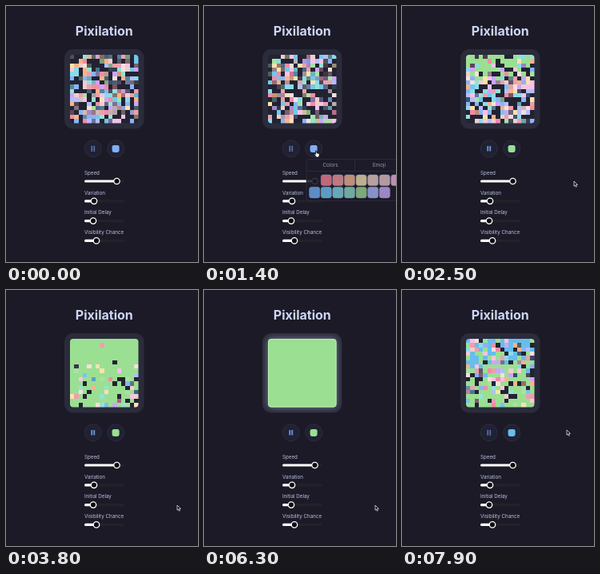
Animation, 240 px wide and 320 px high, one loop 8 s. Source, as an HTML page with a canvas:

```html
<!DOCTYPE html>
<html lang="en">
<head>
<meta charset="utf-8">
<title>Pixilation</title>
<style>
html, body { margin: 0; width: 100%; height: 100%; overflow: hidden; background: #1c1a27; }
canvas { display: block; width: 240px; height: 320px; }
</style>
</head>
<body>
<canvas id="stage"></canvas>
<script>
const LOOP = 8000, STEP = 100;
const N = 16, GX = 80, GY = 61, SIZE = 85.5;
const BG = '#1c1a27', TEXT = '#cdd6f4', BLUE = '#7fb0f8', GREEN = '#9bdf93', SKY = '#68bdec';
const PICKS = [{ at: 1850, color: GREEN }, { at: 7400, color: SKY }];
const MENUS = [[1200, 1950], [7250, 7550]];
const NOISE = ['#f5e0dc', '#f2cdcd', '#f5c2e7', '#cba6f7', '#f38ba8', '#eba0ac', '#fab387',
  '#f9e2af', '#a6e3a1', '#94e2d5', '#89dceb', '#74c7ec', '#89b4fa', '#b4befe'];
const SWATCHES = [
  [null, '#c0687c', '#be7880', '#bf8f78', '#bdb08c', '#b6a0a0', '#b499a2', '#bd8fb5'],
  ['#5a8cc6', '#5c9cc4', '#65a9b8', '#6cab9e', '#78ab76', '#8790c8', '#9c86c8']
];
const SLIDERS = [['Speed', 138.5], ['Variation', 110], ['Initial Delay', 109], ['Visibility Chance', 113]];
// time, x, y of the pointer tip
const PATH = [[0, 217, 330], [300, 217, 300], [500, 215, 262], [1100, 138.5, 181], [1500, 138.5, 181],
  [1800, 196, 232], [2000, 196, 232], [2400, 215, 219], [2900, 215, 219], [3400, 214, 269],
  [6500, 214, 269], [7100, 138, 181], [7300, 138, 181], [7400, 139, 232], [7500, 139, 232],
  [7800, 206, 175], [8000, 206, 175]];

const cv = document.getElementById('stage');
const c = cv.getContext('2d');
const dpr = window.devicePixelRatio || 1;
cv.width = 240 * dpr;
cv.height = 320 * dpr;

const clamp = v => Math.max(0, Math.min(1, v));
const ease = v => v * v * (3 - 2 * v);

function rand(a, b) {
  let h = Math.imul(a + 11, 374761393) ^ Math.imul(b + 7, 668265263);
  h = Math.imul(h ^ (h >>> 13), 1274126177);
  h = Math.imul(h ^ (h >>> 16), 2246822519);
  return ((h ^ (h >>> 15)) >>> 0) / 4294967296;
}

function box(x, y, w, h, r, fill, stroke, lw = 1) {
  c.beginPath();
  c.roundRect(x, y, w, h, r);
  if (fill) { c.fillStyle = fill; c.fill(); }
  if (stroke) { c.strokeStyle = stroke; c.lineWidth = lw; c.stroke(); }
}

function disc(x, y, r, fill, stroke, lw = 1) {
  box(x - r, y - r, 2 * r, 2 * r, r, fill, stroke, lw);
}

function label(s, x, y, size, color, weight = 400, align = 'left') {
  c.font = `${weight} ${size}px Inter, sans-serif`;
  c.textAlign = align;
  c.fillStyle = color;
  c.fillText(s, x, y);
}

const solid = color => ({ color, alpha: 1 });

// a flickering cell: hidden, half faded or fully shown
function noise(id, t, hidden, faded) {
  const period = 200 + 100 * Math.floor(rand(id, 1) * 3);
  const beat = Math.floor((t + rand(id, 2) * 600) / period);
  const show = rand(id, beat + 100);
  if (show < hidden) return { color: BG, alpha: 0 };
  const alpha = show < hidden + faded ? 0.12 + 0.75 * rand(id, beat + 300) : 1;
  return { color: NOISE[Math.floor(rand(id, beat + 500) * NOISE.length)], alpha };
}

function cell(col, row, t) {
  const id = row * N + col;
  if (t < PICKS[0].at) return noise(id, t, 0.34, 0.26);
  if (t < PICKS[1].at) {
    const tail = -Math.log(1 - rand(id, 3)) * (400 + 30 * row);
    const settle = Math.min(5500, 1850 + 100 * row + 6 * col + (col > 14 && row > 1 ? 600 : 0) + tail);
    return t >= settle ? solid(GREEN) : noise(id, t, 0.3, 0.1);
  }
  const age = t - PICKS[1].at;
  const start = row * 18 + rand(id, 4) * 600;
  if (age < start) return solid(GREEN);
  const settle = 60 + row * 45 - Math.log(1 - rand(id, 5)) * 560;
  return age >= settle ? solid(SKY) : noise(id, t, 0.3, 0.1);
}

function grid(t) {
  const glow = ease(clamp((t - 5500) / 600)) * (1 - ease(clamp((t - 6800) / 500)));
  box(73, 54, 99.5, 99.5, 11, '#2a2b3b');
  if (glow > 0) {
    c.save();
    c.beginPath();
    c.roundRect(73, 54, 99.5, 99.5, 11);
    c.clip();
    c.shadowColor = `rgba(205,214,244,${0.5 * glow})`;
    c.shadowBlur = 9 * dpr;
    box(GX, GY, SIZE, SIZE, 4, GREEN);
    c.restore();
  }
  c.save();
  c.beginPath();
  c.roundRect(GX, GY, SIZE, SIZE, 4);
  c.clip();
  c.fillStyle = '#222332';
  c.fillRect(GX, GY, SIZE, SIZE);
  const edge = i => Math.round(i * SIZE / N);
  for (let r = 0; r < N; r++) {
    for (let q = 0; q < N; q++) {
      const { color, alpha } = cell(q, r, t);
      c.globalAlpha = alpha;
      c.fillStyle = color;
      c.fillRect(GX + edge(q), GY + edge(r), edge(q + 1) - edge(q), edge(r + 1) - edge(r));
    }
  }
  c.restore();
  if (glow > 0) box(GX + .5, GY + .5, SIZE - 1, SIZE - 1, 4, null, `rgba(200,245,195,${0.6 * glow})`);
}

function buttons(t) {
  disc(108.8, 178.3, 10.5, '#202133', '#313244', 0.8);
  disc(137.2, 178.3, 10.5, '#202133', '#313244', 0.8);
  const bars = t >= PICKS[0].at && t < PICKS[1].at;
  for (const x of [106.3, 109.3]) {
    if (bars) box(x, 175, 1.9, 6.6, 0.6, '#6f92d2');
    else for (let i = 0; i < 4; i++) box(x, 175 + i * 1.8, 1.9, 1.3, 0.4, '#6d8fcd');
  }
  const color = t < PICKS[0].at ? BLUE : t < PICKS[1].at ? GREEN : SKY;
  box(132.6, 173.9, 9, 9, 2.4, color);
}

function sliders() {
  SLIDERS.forEach(([name, x], i) => {
    const y = 219 + i * 24.8;
    label(name, 98, y - 8.2, 6.25, '#bac2de');
    box(98, y - 1.6, 49.5, 3.2, 1.5, '#232229');
    box(98, y - 1.6, x - 98, 3.2, 1.5, '#ffffff');
    disc(x, y, 3.7, '#0b0b10', '#ffffff', 1.3);
  });
}

function menu(t) {
  let a = 0;
  for (const [open, close] of MENUS) {
    a = Math.max(a, Math.min(clamp((t - open) / 200), clamp((close + 150 - t) / 150)));
  }
  if (a <= 0) return;
  c.save();
  c.globalAlpha = a * 0.88;
  box(128, 191.5, 122, 52, 3, '#1e1c2a', '#313244', 0.8);
  c.fillStyle = '#313244';
  c.fillRect(128, 206, 112, 0.8);
  c.fillRect(188, 191.5, 0.8, 14.5);
  label('Colors', 158, 201, 6.2, '#a6adc8', 400, 'center');
  label('Emoji', 219, 201, 6.2, '#a6adc8', 400, 'center');
  c.globalAlpha = a;
  SWATCHES.forEach((line, r) => line.forEach((color, i) => {
    if (color) box(131.6 + i * 14.6, 211 + r * 15.3, 13.2, 13.6, 3, color, '#8c8fa8', 0.5);
  }));
  c.restore();
}

function shape(points) {
  c.beginPath();
  points.forEach(([x, y]) => c.lineTo(x, y));
  c.closePath();
}

function pointer(t) {
  let i = 0;
  while (i < PATH.length - 2 && t >= PATH[i + 1][0]) i++;
  const [t0, x0, y0] = PATH[i], [t1, x1, y1] = PATH[i + 1];
  const k = ease(clamp((t - t0) / (t1 - t0)));
  const x = x0 + (x1 - x0) * k, y = y0 + (y1 - y0) * k;
  const overButton = Math.hypot(x - 137, y - 178) < 11;
  const overSwatch = MENUS.some(([a, b]) => t > a && t < b) && x > 131 && y > 211 && y < 241;
  c.save();
  c.translate(x, y);
  c.lineJoin = 'round';
  c.lineWidth = 0.8;
  if (overButton || overSwatch) {
    shape([[1, 0], [2.2, 0], [2.4, 2.8], [5.6, 3.5], [5.6, 6], [4.7, 8], [2, 8], [-.7, 4.7], [0, 4.1], [1, 4.8]]);
    c.fillStyle = '#ffffff';
    c.strokeStyle = '#14131c';
  } else {
    shape([[0, 0], [0, 6.2], [1.4, 5], [2.4, 7.2], [3.4, 6.7], [2.5, 4.6], [4.4, 4.4]]);
    c.fillStyle = '#08080c';
    c.strokeStyle = '#e4e4ea';
  }
  c.fill();
  c.stroke();
  c.restore();
}

function draw(t) {
  c.setTransform(dpr, 0, 0, dpr, 0, 0);
  c.fillStyle = BG;
  c.fillRect(0, 0, 240, 320);
  label('Pixilation', 122.8, 36.8, 16, TEXT, 700, 'center');
  grid(t);
  buttons(t);
  sliders();
  menu(t);
  pointer(t);
}

function frame() {
  const t = performance.now() % LOOP;
  draw(Math.floor(t / STEP) * STEP);
  requestAnimationFrame(frame);
}
frame();
</script>
</body>
</html>
```
